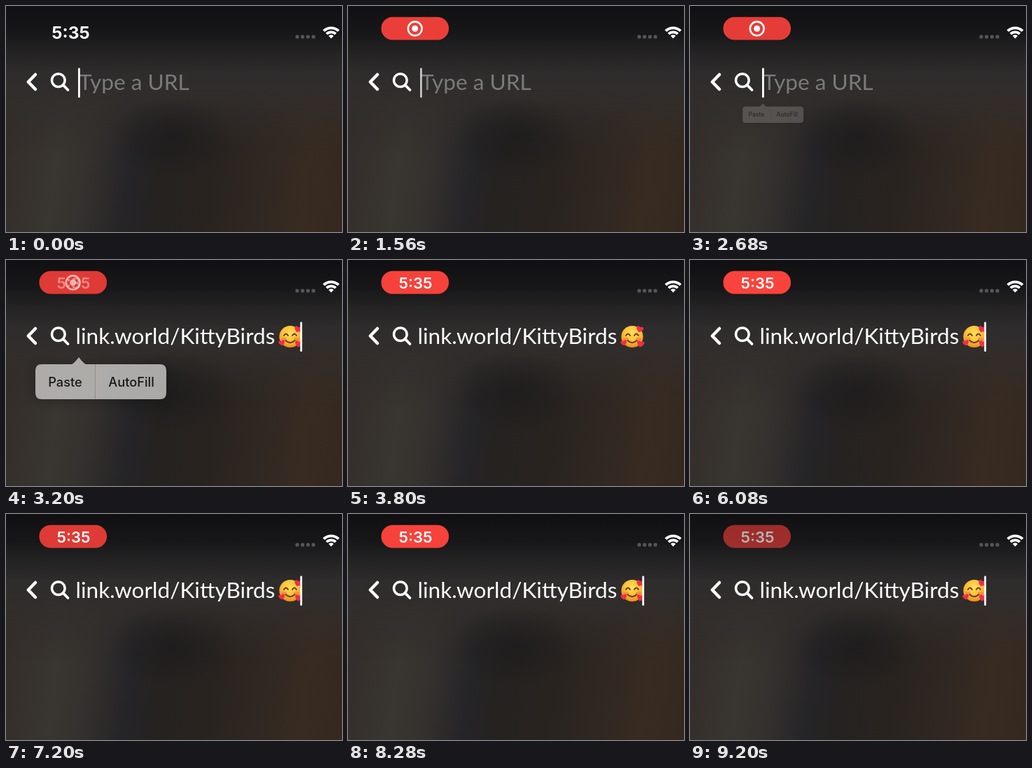
An HTML page that plays this animation: 480 px wide and 323 px high, repeating every 9300 ms.

```html
<!DOCTYPE html>
<html lang="en">
<head>
<meta charset="utf-8">
<title>Paste a link</title>
<style>
  html, body { margin: 0; width: 100%; height: 100%; overflow: hidden; background: #111; }
  svg { display: block; width: 100vw; height: 100vh; }
  text { font-family: Inter, Roboto, sans-serif; text-anchor: middle; }
  .url { font: 31.6px Lato, "Open Sans", sans-serif; text-anchor: start; }
  .line { fill: none; stroke: #fff; stroke-linecap: round; stroke-linejoin: round; }
</style>
</head>
<body>
<svg viewBox="0 0 480 323" preserveAspectRatio="none">
  <defs>
    <linearGradient id="base" x2="0" y2="1">
      <stop offset="0" stop-color="#100f11"/>
      <stop offset=".12" stop-color="#171618"/>
      <stop offset=".2" stop-color="#232223"/>
      <stop offset=".3" stop-color="#2e2c2c"/>
      <stop offset=".42" stop-color="#322e2c"/>
      <stop offset="1" stop-color="#2e2926"/>
    </linearGradient>
    <linearGradient id="bands">
      <stop offset=".07" stop-color="#332e2b"/>
      <stop offset=".2" stop-color="#393530"/>
      <stop offset=".28" stop-color="#35312e"/>
      <stop offset=".39" stop-color="#252427"/>
      <stop offset=".47" stop-color="#252220"/>
      <stop offset=".6" stop-color="#29231f"/>
      <stop offset=".72" stop-color="#2e2722"/>
      <stop offset=".84" stop-color="#382b21"/>
      <stop offset=".95" stop-color="#35291f"/>
    </linearGradient>
    <linearGradient id="rise" x2="0" y2="1">
      <stop offset="0" stop-color="#fff" stop-opacity="0"/>
      <stop offset=".45" stop-color="#fff"/>
    </linearGradient>
    <mask id="lower"><rect y="120" width="480" height="203" fill="url(#rise)"/></mask>
    <radialGradient id="blob">
      <stop offset="0" stop-color="#1c1b1c" stop-opacity=".75"/>
      <stop offset=".5" stop-color="#1c1b1c" stop-opacity=".4"/>
      <stop offset="1" stop-color="#1c1b1c" stop-opacity="0"/>
    </radialGradient>
    <filter id="shade" x="-30%" y="-60%" width="160%" height="220%"><feGaussianBlur stdDeviation="9"/></filter>
    <radialGradient id="skin" cx=".5" cy=".35" r=".65">
      <stop offset="0" stop-color="#ffdf5c"/>
      <stop offset=".55" stop-color="#fcc238"/>
      <stop offset="1" stop-color="#ea8a1e"/>
    </radialGradient>
    <path id="heart" d="M0 5C-8 0-5-6 0-2.500C5-6 8 0 0 5Z" fill="#ee2f45"/>
  </defs>

  <rect width="480" height="323" fill="url(#base)"/>
  <g mask="url(#lower)">
    <rect x="-40" y="100" width="560" height="223" fill="url(#bands)" transform="translate(31) skewX(-8)"/>
  </g>
  <ellipse cx="240" cy="188" rx="90" ry="58" fill="url(#blob)"/>

  <!-- status bar -->
  <g fill="#575556">
    <rect x="413.500" y="41.500" width="5" height="5" rx="1.500"/>
    <rect x="421.200" y="41.500" width="5" height="5" rx="1.500"/>
    <rect x="428.900" y="41.500" width="5" height="5" rx="1.500"/>
    <rect x="436.600" y="41.500" width="5" height="5" rx="1.500"/>
  </g>
  <g fill="none" stroke="#fff" stroke-width="3.800" transform="translate(.5)">
    <path d="M453.300 35.700A15.200 15.200 0 0 1 474.700 35.700"/>
    <path d="M457.500 40A9.200 9.200 0 0 1 470.500 40"/>
    <path d="M464 46.500L460.400 42.700A5.200 5.200 0 0 1 467.600 42.700Z" fill="#fff" stroke="none"/>
  </g>
  <text id="clock" x="92.500" y="46.500" font-size="24.500" font-weight="700" fill="#fff">5:35</text>
  <g id="pill">
    <rect id="red" x="47.500" y="15.700" width="96.500" height="32.700" rx="16"/>
    <text id="time" x="96.500" y="40.800" font-size="22" font-weight="600" fill="#fff">5:35</text>
    <g id="rec">
      <circle class="line" cx="95.700" cy="32.300" r="9.900" stroke-width="2.600"/>
      <circle cx="95.700" cy="32.300" r="4.500" fill="#fff"/>
    </g>
  </g>

  <!-- address bar -->
  <path class="line" d="M42 98L31.800 108.500L42 119" stroke-width="4.500"/>
  <circle class="line" cx="74.800" cy="106.200" r="9.300" stroke-width="3.500"/>
  <path class="line" d="M81.800 113.200L88.500 120" stroke-width="3.800"/>
  <text id="hint" class="url" x="104" y="120" fill="#7b797a">Type a URL</text>
  <g id="link">
    <text class="url" x="99.500" y="120" fill="#fff">link.world/KittyBirds</text>
    <g transform="translate(406 109.500)">
      <circle r="15.600" fill="url(#skin)"/>
      <g fill="#f4793f" opacity=".6"><ellipse cx="-9" cy="4" rx="4" ry="3"/><ellipse cx="9" cy="4" rx="4" ry="3"/></g>
      <g fill="none" stroke="#6b3a12" stroke-width="1.900" stroke-linecap="round">
        <path d="M-9-1.500Q-6-6.500-3-1.500M3-1.500Q6-6.500 9-1.500M-6.500 5.500Q0 12 6.500 5.500"/>
      </g>
      <use href="#heart" transform="translate(11 -11) rotate(14)"/>
      <use href="#heart" transform="translate(-12 8.500) rotate(-14) scale(.9)"/>
      <use href="#heart" transform="translate(12 10) rotate(12) scale(1.050)"/>
    </g>
  </g>
  <rect id="caret" y="88.500" width="2.800" height="42.500" rx="1.200" fill="#fff"/>

  <!-- edit menu -->
  <g id="menu">
    <rect x="42" y="151" width="187" height="50" rx="10" opacity=".3" filter="url(#shade)"/>
    <path d="M51 149H94Q97 148 104 139Q111 148 114 149H220Q229 149 229 158V190Q229 199 220 199H51Q42 199 42 190V158Q42 149 51 149Z" fill="#c6c4c2"/>
    <path d="M127.500 149V199" stroke="#a29f9d"/>
    <g font-size="18.300" font-weight="500" fill="#161516">
      <text x="84.500" y="180.500">Paste</text>
      <text x="179" y="180.500">AutoFill</text>
    </g>
  </g>
</svg>
<script>
const LOOP = 9300, PASTE = 3120, TAP = 2160;
const el = id => document.getElementById(id);
const [clock, pill, red, time, rec, hint, link, caret, menu] =
  ["clock", "pill", "red", "time", "rec", "hint", "link", "caret", "menu"].map(el);
const ramp = (t, a, b) => Math.min(1, Math.max(0, (t - a) / (b - a)));
const ease = (t, a, b) => { const k = ramp(t, a, b); return k * k * (3 - 2 * k); };
const fade = (node, v) => node.setAttribute("opacity", v.toFixed(3));

function blink(t) {
  if (t > TAP && t < PASTE) return 1;
  const p = t % 1000;
  return 1 - ramp(p, 500, 720) + ramp(p, 920, 1000);
}

function draw(t) {
  // the pill glows brightest on even seconds
  const glow = (1 + Math.cos(Math.PI * (t - 40) / 1000)) / 2;
  const mix = (a, b) => Math.round(a + (b - a) * glow);
  red.setAttribute("fill", `rgb(${mix(221, 250)},${mix(57, 67)},${mix(53, 60)})`);
  const shown = ease(t, 20, 400);
  fade(pill, shown * (1 - 0.32 * ramp(t, 9040, 9200)));
  fade(clock, 1 - shown);

  const swap = ease(t, PASTE - 40, 3360);
  fade(rec, ease(t, 200, 600) * (1 - swap));
  fade(time, swap);

  const pasted = t >= PASTE;
  fade(hint, pasted ? 0 : 1);
  fade(link, pasted ? 1 : 0);
  caret.setAttribute("x", pasted ? 420.300 : 103);
  fade(caret, blink(t));

  const scale = 0.2 + 0.8 * ease(t, 2600, 2810);
  menu.setAttribute("transform", `translate(104 139) scale(${scale}) translate(-104 -139)`);
  fade(menu, ramp(t, 2640, 2810) * (1 - ease(t, PASTE, 3440)));
}

const start = performance.now();
function tick() {
  draw((performance.now() - start) % LOOP);
  requestAnimationFrame(tick);
}
draw(0);
requestAnimationFrame(tick);
</script>
</body>
</html>
```
